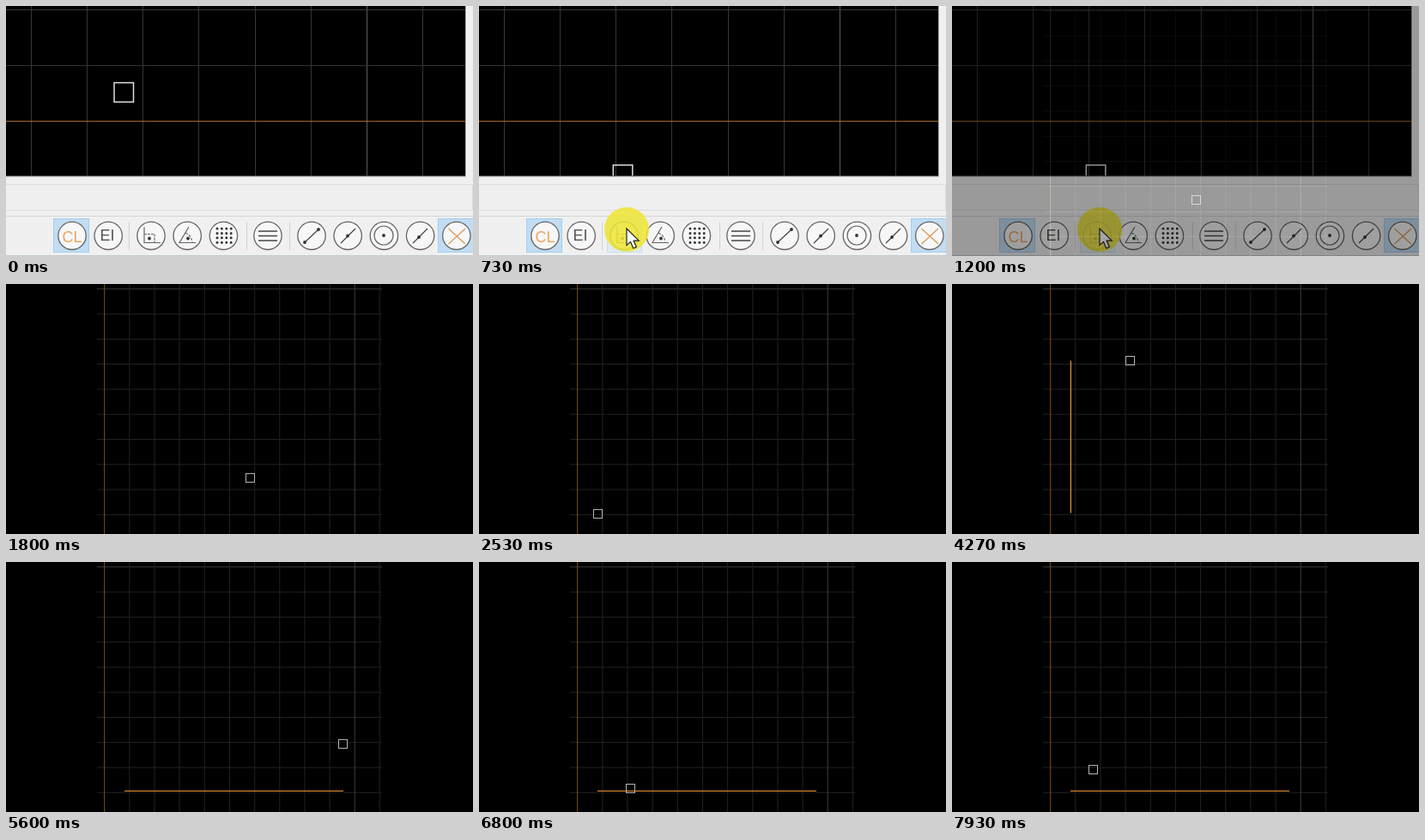
An HTML page for the animation above (8 s loop, 544 by 292 pixels).

```html
<!DOCTYPE html>
<html lang="en">
<head>
<meta charset="utf-8">
<title>Ortho line drawing</title>
<style>
  html, body { margin: 0; width: 100%; height: 100%; overflow: hidden; background: #000; }
  svg { display: block; width: 100vw; height: 100vh; }
  text { font: 18px "Liberation Sans", Arial, sans-serif; text-anchor: middle; }
</style>
</head>
<body>
<svg viewBox="0 0 544 292" preserveAspectRatio="none">
  <defs>
    <clipPath id="canvasClip"><rect width="535" height="198"/></clipPath>
  </defs>

  <g id="drawing">
    <rect width="544" height="292"/>
    <g id="farGrid"></g>
    <path id="segment" fill="none" stroke="#e8923a" stroke-width="1.2"/>
    <rect id="farBox" width="10" height="10" fill="none" stroke="#b4b4b4"/>
  </g>

  <g id="toolView">
    <rect width="544" height="292" fill="#f0f0f0"/>
    <rect width="536" height="199.5" fill="#b5adad"/>
    <rect width="535" height="198.5"/>
    <g id="nearGrid"></g>
    <g clip-path="url(#canvasClip)">
      <rect id="nearBox" width="22.5" height="22.5" fill="none" stroke="#dedede" stroke-width="1.5"/>
    </g>
    <path d="M0 208.5H543.5V238.5H0" fill="#efefef" stroke="#dcdcdc"/>
    <path d="M0 245.5H544" stroke="#d6d6d6"/>
    <path d="M0 291.5H544" stroke="#c3ccd2"/>
    <path d="M143.5 252V285M280.5 252V285M330.5 252V285" stroke="#d2d2d2"/>
    <g fill="#c2ddf3" stroke="#a3cdf0">
      <rect x="55.5" y="248.5" width="41" height="39"/>
      <rect x="503.5" y="248.5" width="42" height="39"/>
    </g>
    <rect id="hover" x="149.5" y="248.5" width="40" height="39" fill="#deebf6" stroke="#c9dff2"/>
    <g id="rings" fill="#f7f7f7" stroke="#666" stroke-width="1.3"></g>
    <text x="77" y="275.5" fill="#eda45c">CL</text>
    <text x="118" y="274" fill="#555">EI</text>
    <g fill="none" stroke="#666" stroke-width="1.2">
      <path d="M161 258V276.5H180"/>
      <path d="M161 266.5H173V276" stroke-dasharray="3 1"/>
      <path d="M213 258L202 276.5H221"/>
      <path d="M209 265Q216 268 217 276" stroke-dasharray="3 1.5"/>
      <path d="M294 263H316M294 268.5H316M294 274H316" stroke="#444" stroke-width="1.4"/>
      <path d="M348 276L364 261M390 277L407 260M474 277L491 260" stroke="#444"/>
      <circle cx="440" cy="268" r="11"/>
      <path d="M515.5 260L535 278M535 260L515.5 278" stroke="#d99a58" stroke-width="1.3"/>
    </g>
    <!-- zero-length round strokes make the dots -->
    <g fill="none" stroke="#333" stroke-linecap="round">
      <path id="dotGrid" stroke-width="3"/>
      <path d="M167 271.5h0M212 271.5h0M398 268.5h0M440 268h0M481 270h0M348 276h0M364 261h0" stroke-width="3.8"/>
    </g>
    <g id="pointer">
      <circle r="26" cy="1" fill="#efe632" opacity=".85"/>
      <path d="M0 0V19.5L4.5 15.4L7.8 23L11.4 21.4L8.1 14.1H14.2Z" fill="#fff" stroke="#222" stroke-width="1.2"/>
    </g>
  </g>
</svg>

<script>
const $ = id => document.getElementById(id);
const NS = "http://www.w3.org/2000/svg";

function set(el, attrs) {
  for (const k in attrs) el.setAttribute(k, attrs[k]);
}
function add(parent, tag, attrs) {
  const el = document.createElementNS(NS, tag);
  set(el, attrs);
  parent.appendChild(el);
}
const show = (el, on) => { el.style.display = on ? "" : "none"; };
const stroke = (g, d, color) => add(g, "path", { d, stroke: color });
const half = v => Math.floor(v) + 0.5;

function build() {
  const far = $("farGrid"), near = $("nearGrid");
  for (let k = 0; k < 10; k++)
    stroke(far, `M106 ${5.8 + k * 29.28}H438`, k ? "#222" : "#3a3a3a");
  for (let k = 11; k >= 0; k--)
    stroke(far, `M${114.7 + k * 29.15} 0V292`, k === 0 ? "#80501f" : k === 10 ? "#3e3e3e" : "#222");

  for (let k = 0; k < 8; k++)
    stroke(near, `M${half(29 + k * 65.25)} 0V198`, k === 6 ? "#5c5c5c" : "#363636");
  for (let k = 0; k < 3; k++)
    stroke(near, `M0 ${4.5 + k * 65.1}H535`, k === 2 ? "#b3722f" : "#363636");

  // Each group of buttons is its first centre and its length.
  for (const [first, count] of [[77, 2], [169, 3], [305, 1], [356, 5]])
    for (let i = 0; i < count; i++)
      add($("rings"), "circle", { cx: first + i * 42.2, cy: 268.3, r: 16.2 });

  let dots = "";
  for (let i = 0; i < 16; i++) dots += `M${246 + (i % 4) * 5.4} ${260 + (i >> 2) * 5.4}h0`;
  set($("dotGrid"), { d: dots });
}

// Time is counted in ticks of 1/15 s.
const TICK = 1000 / 15, TICKS = 120;
const FIRST_CLICK = 39, LAST_CLICK = 84;
const START = { x: 138, y: 267.5 }, END_X = 393;
const home = { x: 284.5, y: 226.5 };
const moves = [
  { from: 28, to: 35, x: 133.5, y: 268.5 },
  { from: 36, to: 38, x: 138, y: 268 },
  { from: 39, to: 54, x: 364, y: 256 },
  { from: 57, to: 69.8, x: 167, y: 46.5 },
  { from: 69.8, to: 83, x: 392.5, y: 212.5 },
  { from: 93, to: 107, x: 145, y: 272 },
  { from: 113, to: 119, x: 164.5, y: 242.5 }
];

const progress = (t, from, to) => Math.min(1, Math.max(0, (t - from) / (to - from)));
const easeOut = u => 1 - (1 - u) ** 2;
const easeInOut = u => u * u * (3 - 2 * u);
const mix = (a, b, u) => a + (b - a) * u;

function cursorAt(t) {
  return moves.reduce((p, m) => {
    const u = easeOut(progress(t, m.from, m.to));
    return { x: mix(p.x, m.x, u), y: mix(p.y, m.y, u) };
  }, home);
}

function showTools(t) {
  const fade = progress(t, 13, 27);
  show($("toolView"), fade < 1);
  $("toolView").style.opacity = 1 - fade;

  const u = easeInOut(progress(t, 1, 11));
  const x = mix(137.2, 172, easeOut(u)), y = mix(100.8, 260, u);
  set($("nearBox"), { x: Math.min(x, 167.5) - 11.2, y: Math.min(y, 197) - 11.2 });
  set($("pointer"), { transform: `translate(${x} ${y})` });
  show($("pointer"), y > 198);
  show($("hover"), y > 247);
}

function showDrawing(t) {
  const { x, y } = cursorAt(t);
  set($("farBox"), { x: half(x - 5), y: half(y - 5) });

  // Ortho mode keeps the longer axis until the end point is set.
  const done = t >= LAST_CLICK;
  const upright = !done && Math.abs(y - START.y) > Math.abs(x - START.x);
  const end = upright ? `V${y}` : `H${done ? END_X : x + 0.5}`;
  set($("segment"), { d: `M${START.x + (upright ? 0.4 : 0)} ${START.y}${end}` });
  show($("segment"), t > FIRST_CLICK);
}

function frame(now) {
  const t = Math.floor((now + 4) / TICK) % TICKS;
  showTools(t);
  showDrawing(t);
  requestAnimationFrame(frame);
}

build();
frame(0);
</script>
</body>
</html>
```
